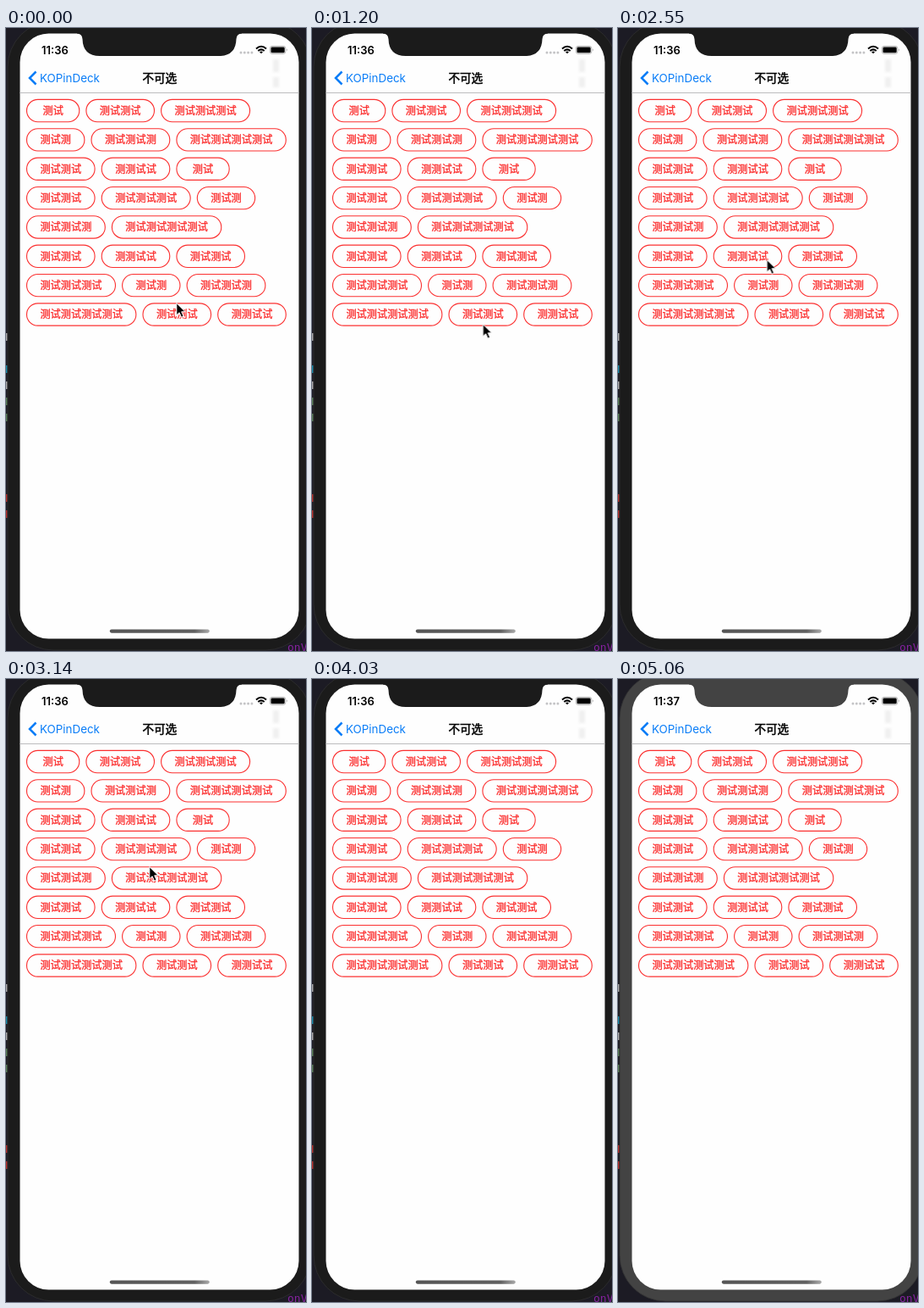
An HTML page that plays this animation: 355 px wide and 735 px high, repeating every 5160 ms.

```html
<!DOCTYPE html>
<html lang="zh">
<head>
<meta charset="utf-8">
<style>
  html, body { margin: 0; width: 100%; height: 100%; overflow: hidden; background: #1c1b24; }
  svg { display: block; }
  text { font-family: Inter, "Noto Sans CJK SC", "Noto Sans CJK", sans-serif; }
  .clock { font-size: 13px; font-weight: 600; }
  .back { font-size: 13.4px; fill: #087cf7; }
  .title, .tag text { font-family: "Noto Sans CJK SC", "Noto Sans CJK", sans-serif; text-anchor: middle; }
  .title { font-size: 13.6px; stroke: #000; stroke-width: .5px; }
  .tag rect { fill: none; stroke: #fb3030; stroke-width: 1.1px; }
  .tag text { font-size: 12.2px; fill: #fb2c2c; stroke: #fb2c2c; stroke-width: .3px; }
  .code { font: 13px "DejaVu Sans Mono", monospace; fill: #84229e; }
</style>
</head>
<body>
<svg width="355" height="735" viewBox="0 0 355 735">
  <defs>
    <linearGradient id="bar">
      <stop offset="0" stop-color="#555"/>
      <stop offset=".85" stop-color="#606060"/>
      <stop offset="1" stop-color="#aaa"/>
    </linearGradient>
    <filter id="soft" x="-50%" y="-50%" width="200%" height="200%"><feGaussianBlur stdDeviation="1.5"/></filter>
  </defs>

  <!-- desktop behind the phone -->
  <rect width="355" height="735" fill="#1c1b24"/>
  <g id="specks"></g>
  <text class="code" x="333" y="735">onV</text>

  <!-- phone -->
  <g id="bezel" fill="#1b1b1b">
    <rect x="2" y="-8" width="359" height="742" rx="54" stroke="#303032" stroke-width=".8"/>
    <rect x="16.5" y="6.5" width="330" height="714" rx="34" fill="#fefefe"/>
    <path d="M84 5V6.5Q90 6.500 90.500 13Q91 33 111 33H252Q272 33 272.500 13Q273 6.500 279 6.500V5Z"/>
  </g>

  <!-- status bar -->
  <text class="clock" id="before" x="42" y="30.500">11:36</text>
  <text class="clock" id="after" x="42" y="30.500" opacity="0">11:37</text>
  <path d="M278 29H292" stroke="#c4c4c6" stroke-width="3" stroke-linecap="round" stroke-dasharray="0 4.300"/>
  <g fill="none" stroke="#000" stroke-width="2">
    <path d="M296 24.500Q302 19 308 24.500M298.300 27Q302 23.800 305.700 27"/>
    <path d="M300 28.200Q302 26.800 304 28.200L302 30.300Z" fill="#000" stroke="none"/>
  </g>
  <rect x="312.400" y="21.400" width="18.400" height="9" rx="2.500" fill="#fff" stroke="#a5a5a5" stroke-width=".8"/>
  <rect x="313.500" y="22.500" width="16.200" height="6.800" rx="1.400"/>
  <path d="M332 24.300q1.600 1.600 0 3.200z" fill="#999"/>

  <!-- navigation bar -->
  <g fill="#f0f0f0" filter="url(#soft)">
    <rect x="316" y="37" width="7" height="15"/><rect x="316" y="58" width="7" height="12"/>
  </g>
  <path d="M35.500 51.500L28 59L35.500 66.500" fill="none" stroke="#087cf7" stroke-width="2.500"/>
  <text class="back" x="40" y="63.700">KOPinDeck</text>
  <text class="title" x="181.800" y="64">不可选</text>
  <path d="M16.500 76.500H346.500" stroke="#bcbcbe"/>

  <g id="tags"></g>
  <rect x="122.800" y="709.500" width="118" height="4.200" rx="2.100" fill="url(#bar)"/>

  <path id="cursor" d="M.8 .5V14.800L4.100 11.700L6.600 17.300L9.100 16.200L6.700 10.800H11.200Z" stroke="#fff"/>
</svg>
<script>
const LOOP = 5160;
const TICK = 150;
const byId = id => document.getElementById(id);

function add(parent, name, attrs, content = '') {
  const node = document.createElementNS('http://www.w3.org/2000/svg', name);
  for (const key in attrs) node.setAttribute(key, attrs[key]);
  node.textContent = content;
  return parent.appendChild(node);
}

// Tags flow from left to right and wrap at the screen margin.
// A digit is a label length; x is the label with doubled characters.
const LEFT = 24.5, RIGHT = 333, GAP = 8.1;
let x = LEFT, y = 84.4;
for (const kind of '2463584x2463584x463584x') {
  const label = kind === 'x' ? '测测试试' : '测试'.repeat(4).slice(0, kind);
  const width = Math.max(62.3, label.length * 12.2 + 31.8);
  if (x + width > RIGHT) {
    x = LEFT;
    y += 34.35;
  }
  const tag = add(byId('tags'), 'g', { class: 'tag' });
  add(tag, 'rect', { x, y, width, height: 26.3, rx: 13.15 });
  add(tag, 'text', { x: x + width / 2, y: y + 17.6 }, label);
  x += width + GAP;
}

// Line ends of a code editor, evenly spaced along the left edge.
const inks = { w: '#aaa', c: '#168aaa', g: '#587f58', r: '#b52f2c' };
[...'w-cwgg----rr'].forEach((ink, line) =>
  add(byId('specks'), 'rect', { x: 0, y: 360 + line * 19, width: 1.6, height: 9, fill: inks[ink] || 'none' }));

// Plays [time, value] pairs as hard steps.
function play(id, property, steps) {
  const frames = steps.map(([time, value]) =>
    ({ offset: time / LOOP, [property]: value, easing: 'steps(1, end)' }));
  frames.push({ offset: 1, [property]: steps[steps.length - 1][1] });
  byId(id).animate(frames, { duration: LOOP, iterations: Infinity });
}

// The pointer follows curves, sampled once per tick.
const place = (px, py) => `translate(${px}px, ${py}px)`;
const track = [[0, place(201, 324)]];
let here = [201, 324];
function move(start, count, bend, end) {
  for (let i = 1; i <= count; i++) {
    const t = i / count;
    const [px, py] = here.map((from, k) =>
      (1 - t) ** 2 * from + 2 * t * (1 - t) * bend[k] + t * t * end[k]);
    track.push([start + (i - 1) * TICK, place(px, py)]);
  }
  here = end;
}
move(150, 2, [226, 334], [246, 338]);
move(600, 6, [206, 375], [198, 339]);
move(1650, 3, [185, 320], [171, 306]);
move(2250, 4, [186, 284], [169, 262]);
move(2840, 3, [154, 240], [169, 221]);
move(3280, 3, [168, 209], [159, 155]);
move(3880, 1, here, [228, 239]);

play('cursor', 'transform', track);
play('cursor', 'opacity', [[0, 1], [4030, 0]]);
play('before', 'opacity', [[0, 1], [4620, 0]]);
play('after', 'opacity', [[0, 0], [4620, 1]]);
play('bezel', 'fill', [[0, '#1b1b1b'], [5060, '#434343']]);
</script>
</body>
</html>
```
